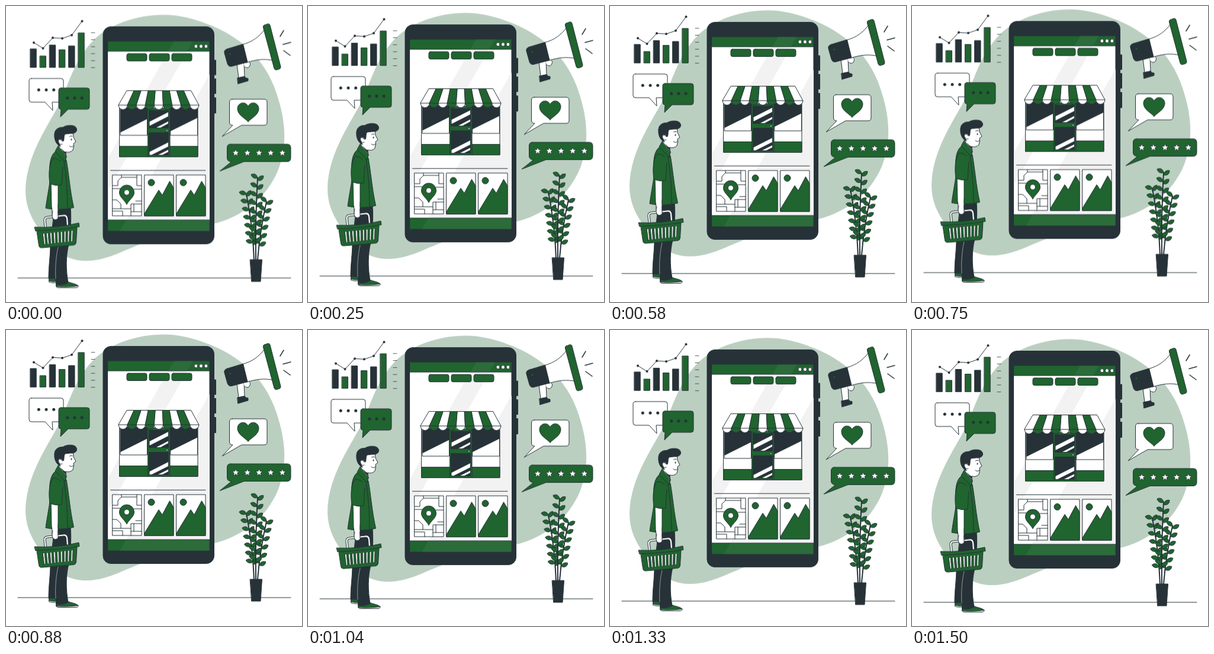
Recreate the animation shown at these times as an HTML page. Size 500 px wide and 500 px high, loop 1540 ms.

```html
<!DOCTYPE html>
<html lang="en">
<head>
<meta charset="utf-8">
<title>Online shop</title>
<style>
html, body { margin: 0; width: 100%; height: 100%; overflow: hidden; background: #fff; }
svg { display: block; width: 100vw; height: 100vh; }
#scene { stroke: #263238; stroke-width: 1; stroke-linejoin: round; stroke-linecap: round; animation: float 1540ms linear -45ms infinite; }
@keyframes float { 50% { transform: translateY(-10px); } }
.g { fill: #20642f; }
.d { fill: #263238; }
.w { fill: #fff; }
.l { fill: none; }
.n { stroke: none; }
.shine { fill: #f2f2f2; stroke: none; }
</style>
</head>
<body>
<svg viewBox="0 0 500 500">
<defs>
  <path id="star" class="w" stroke-width=".8" d="M0-6L1.7-2H6L2.7 1 3.8 5.4 0 2.9-3.8 5.4-2.7 1-6-2H-1.7Z"/>
  <path id="leaf" class="g" d="M0 0C3-5 9-6 14-2C11 4 5 5 0 0Z"/>
  <g id="photo">
    <rect class="w" x="234" y="286" width="49" height="69"/>
    <circle class="g" cx="245.5" cy="298.8" r="5.5"/>
    <path class="g" d="M234 355V351L258 311.5 264 320 276.5 296.5 283 307.500V355Z"/>
  </g>
  <clipPath id="screen"><rect x="172" y="60" width="172" height="321"/></clipPath>
</defs>
<g id="scene">
  <path class="n" fill="#bbcfc1" d="M264 15.500C225 16 181 28 150 56C118 88 108 125 93 160C75 198 34 250 33 312C33 350 52 374 75 402C92 424 115 432 140 431C175 429 200 412 235 400C280 385 320 376 352 368C395 358 440 327 460 277C476 235 473 190 453 137C430 78 380 45 340 31C315 21 290 15 264 15.500Z"/>
  <path class="l" d="M20 460H481"/>

  <g id="chart"></g>

  <path class="w" d="M43 123H93Q97 123 97 127V159Q97 163 93 163H78L79 177 66 163H43Q39 163 39 159V127Q39 123 43 123Z"/>
  <path class="g" d="M93 139H137Q141 139 141 143V171Q141 175 137 175H105L92 188 93 175Q89 175 89 171V143Q89 139 93 139Z"/>
  <g id="dots" class="d n"></g>

  <g id="phone">
    <path class="d" d="M351 92h3.500v25H351zM351 123.500h3.500v25H351zM351 155.500h3.500v26H351z"/>
    <rect class="d" x="164" y="35.500" width="187.500" height="367" rx="13"/>
    <rect class="w" x="172" y="60" width="172" height="321"/>
    <g clip-path="url(#screen)">
      <path class="shine" d="M284 60H316L172 312V258ZM344 116V381H192Z"/>
      <path class="g" d="M172 60H344V77H172ZM172 362H344V381H172Z"/>
      <path class="n" fill="#fff" opacity=".05" d="M284 60H316L306 77H274ZM203 362H344V381H192Z"/>
    </g>
    <g id="header"></g>

    <path class="w" d="M192 168H324V255H192Z"/>
    <path class="g" d="M192 237.500H324V255.500H192Z"/>
    <path class="w" d="M193.500 174H238.500V219H193.500ZM278 174H323.500V219H278Z"/>
    <path class="d" d="M193.500 172H238.500V191L193.500 213.500ZM278 172H323.500V189L278 211.500Z"/>
    <path class="g" d="M240 173H277V255.500H240Z"/>
    <path class="d" d="M242 177H274.500V206.500H242ZM242 214.500H274.500V252.500H242Z"/>
    <path class="w n" d="M242.500 196L274 180V187L242.500 203ZM254 206L274 195.500V199L261 206ZM242.500 247L274 231V238L246 252H242.500ZM257 252L274 243.500V247L264 252Z"/>
    <circle class="w" cx="272" cy="210.800" r="1.500"/>
    <g id="awning"></g>

    <path class="l" d="M176.500 278.300H337"/>
    <rect class="w" x="180" y="286" width="49" height="69"/>
    <path class="l" d="M180 304H189V296L195 290H221V286M195 290V286M180 309H193M221 290V304H229M216 310H229M180 328H187L194 335V343H180M180 347H197V355M194 343H211V355M211 343V335H229M216 335V348H229M211 348H216M219 330H229"/>
    <path class="g" d="M204 335.500C199 327 191.500 323 191.500 315.500A12.500 12.500 0 0 1 216.500 315.500C216.500 323 209 327 204 335.500Z"/>
    <circle class="w" cx="204" cy="315.500" r="4.600"/>
    <use href="#photo"/><use href="#photo" x="54"/>
  </g>

  <g id="megaphone">
    <path class="w" d="M390 98L393 122 403 120 402 96Z"/>
    <path class="w" d="M401 96C411 91 415 97 411 103C409 106 405 105 403 103"/>
    <path class="d" d="M391 122L403 119.500 405 122 409 123V127L392 132Z"/>
    <path class="w" d="M400 65.500C417 61 428 52 437 40L453 93C438 89 422 91 407 96Z"/>
    <path class="d" d="M374 73L400.500 65 408 95.500 381 102.500Q376 103.500 374 98L369 80Q367.500 75 374 73Z"/>
    <circle class="g" cx="379" cy="81.800" r="2"/>
    <path class="g" d="M436 33L442 30.800Q445 30 446 33L464 103Q464.500 106 462 107L457 108.500Q454 109 453 106L434.500 37Q433.500 34 436 33Z"/>
    <path class="l" stroke-width="1.500" d="M463 52L469 42M468 65.500L481 62M469 76L480 84"/>
  </g>

  <path class="w" d="M382 158H436Q441 158 441 163V197Q441 202 436 202H398L365 221 383 202Q377.500 202 377.500 197V163Q377.500 158 382 158Z"/>
  <path class="g" d="M409 196C402 189 391 184 391 174C391 164 404 160 409 170C414 160 427 164 427 174C427 184 416 189 409 196Z"/>
  <path class="g" d="M379 234H475Q481 234 481 240V257Q481 263.500 475 263.500H402L361 279.500 381 263.500Q373.500 263.500 373.500 257V240Q373.500 234 379 234Z"/>
  <g id="stars"></g>

  <g id="plant"></g>
  <path class="d" d="M412.500 429H432.500L430 466H415Z"/>

  <g id="man">
    <path class="w" d="M73 464H86V468Q78 469 73 467Z"/>
    <path class="g" d="M73 460H85L87 466Q78 467 73 465Z"/>
    <path class="w" d="M85 474L122 473Q123 476 118 476.500H88Q85 476.500 85 474Z"/>
    <path class="g" d="M85 469L104 466C109 469 118 469 122 473.500Q102 476 85 474.500Z"/>
    <path class="d" d="M82 342H109C111 365 108 385 106 403C101 423 101 446 105 468Q95 473 85 471L84 461 72 461C72 440 75 422 75 405Z"/>
    <path class="l" stroke="#fff" stroke-width=".5" d="M88 408C84 425 83 445 84 461"/>
    <path class="w" d="M90 232L88 242 102 257 101 247Q108 249 113 244L114.500 237 114 233 118 230 114 222 113 213H97Z"/>
    <path class="d n" d="M101 247C97 246 95 243 93 240Q95 246 101 252Z"/>
    <path class="d" d="M82 217C82 209 89 205 96 205.500C102 201 119 200 119.500 209C120 215 113 216.500 108 216L100 217C97 220 99 225 97 229L95 228C94 224 88 224 88.500 229C89 233 91 234 92 238C84 234 81 225 82 217Z"/>
    <path class="w" d="M95 229C92 224 87 226 89 231Q91 236 95 234"/>
    <path class="l" d="M107.500 221Q110 219 112 220.500M107 237Q110 240 114 237"/>
    <ellipse class="d n" cx="110.500" cy="226" rx="1" ry="1.500"/>
    <path class="g" d="M84 246L102 261C106 282 108 312 114.500 341C100 345 80 345 67 342C70 320 74 302 75 288C72 272 74 253 84 246Z"/>
    <path class="g" d="M88 237L83 246 100 264 102 255Z"/>
    <path class="w" d="M76 298L77 340C79 348 77 356 79 360Q83 364 88 359C89 350 87 342 88 333V300Z"/>
    <path class="g" d="M80 258C72 266 72 286 74 301Q84 305 94 303C95 290 95 280 96 273"/>
    <path class="l" d="M80 258Q88 258 92 263M98 263Q104 300 104 342"/>
    <path class="l" stroke-width="4.200" d="M67 376L65.500 363Q65 358 70 357.500L97 354.500Q102 354 103 359L104 371"/>
    <path class="l" stroke="#fff" stroke-width="2.200" d="M67 376L65.500 363Q65 358 70 357.500L97 354.500Q102 354 103 359L104 371"/>
    <path class="w" d="M79 347Q77 355 79 359Q83 364 88 359L87.500 347" stroke-width=".9"/>
    <path class="g" d="M52 379L120 374 118.500 400Q118 404 114 404.500L61 409Q56 409.500 55.500 405Z"/>
    <g id="slots"></g>
    <path class="g" d="M48.500 374Q86 376 123 367L124 373.500Q90 379 50 380.500Z"/>
  </g>
</g>
</svg>
<script>
const add = (id, html) => document.getElementById(id).insertAdjacentHTML('beforeend', html);
const times = (n, fn) => Array.from({ length: n }, (_, i) => fn(i)).join('');
const dot = (x, y, r, cls) => `<circle class="${cls}" cx="${x}" cy="${y}" r="${r}"/>`;

// Bar chart
const tops = [73, 85, 66.5, 74.5, 68, 46];
const points = [[47, 62.5], [62.5, 72], [79, 54.3], [95, 55.3], [111, 49.8], [128.5, 26.2]];
add('chart', tops.map((y, i) =>
  `<rect class="${i % 2 ? 'g' : 'd'}" x="${41.2 + i * 16.2}" y="${y}" width="10" height="${104.3 - y}"/>`).join('')
  + `<polyline class="l" points="${points}"/>`
  + points.map(([x, y]) => dot(x, y, 2, 'd n')).join('')
  + times(6, i => `<path stroke-width=".8" d="M144 ${45.7 + i * 11.8}h6"/>`));

add('dots', times(3, i => dot(55.3 + i * 12.7, 142.3, 2.5, '') + dot(103.7 + i * 12.2, 156, 2.5, '')));
add('header', times(3, i => dot(321 + i * 8.5, 68.7, 3.1, 'w')
  + `<rect class="g" x="${204 + i * 38}" y="81" width="34" height="12.500" rx="3"/>`));
add('stars', times(5, i => `<use href="#star" x="${388 + i * 19.7}" y="248.500"/>`));

// Striped awning with a scalloped hem
add('awning', times(9, i => {
  const top = k => 204.5 + k * 12, low = k => 190 + k * 15.1;
  return `<path class="${i % 2 ? 'g' : 'w'}" d="M${top(i)} 143.500H${top(i + 1)}L${low(i + 1)} 168A7.550 7.500 0 0 1 ${low(i)} 168Z"/>`
    + `<path d="M${low(i)} 168h15.100"/>`;
}));

add('slots', times(9, i => {
  const x = 62.5 + i * 6, y = 384.5 - i * .6;
  return `<path class="w" stroke-width=".8" d="M${x} ${y}h2.500l${1.8 - i * .35} 19h-2z"/>`;
}));

// Stems are quadratic curves carrying pairs of leaves
const stem = (x0, x1, x2, y2, pairs) => {
  const y0 = 429, y1 = (y0 + y2) / 2;
  const at = (a, b, c, t) => (1 - t) ** 2 * a + 2 * t * (1 - t) * b + t * t * c;
  const leaf = (x, y, turn, s) => `<use href="#leaf" transform="translate(${x} ${y}) rotate(${turn}) scale(${s})"/>`;
  const lean = Math.atan2(x2 - x1, y1 - y2) * 57.3;
  return `<path class="l" stroke-width="2" d="M${x0} ${y0}Q${x1} ${y1} ${x2} ${y2}"/>`
    + times(pairs, i => {
      const t = 1 - i * .86 / pairs, x = at(x0, x1, x2, t), y = at(y0, y1, y2, t);
      return leaf(x, y, lean - 148, .88) + leaf(x, y + 4, lean - 32, .88);
    });
};
add('plant', stem(419, 417, 406, 318, 7) + stem(425, 429, 440, 331, 6) + stem(422, 421, 425, 291, 8));
</script>
</body>
</html>
```
